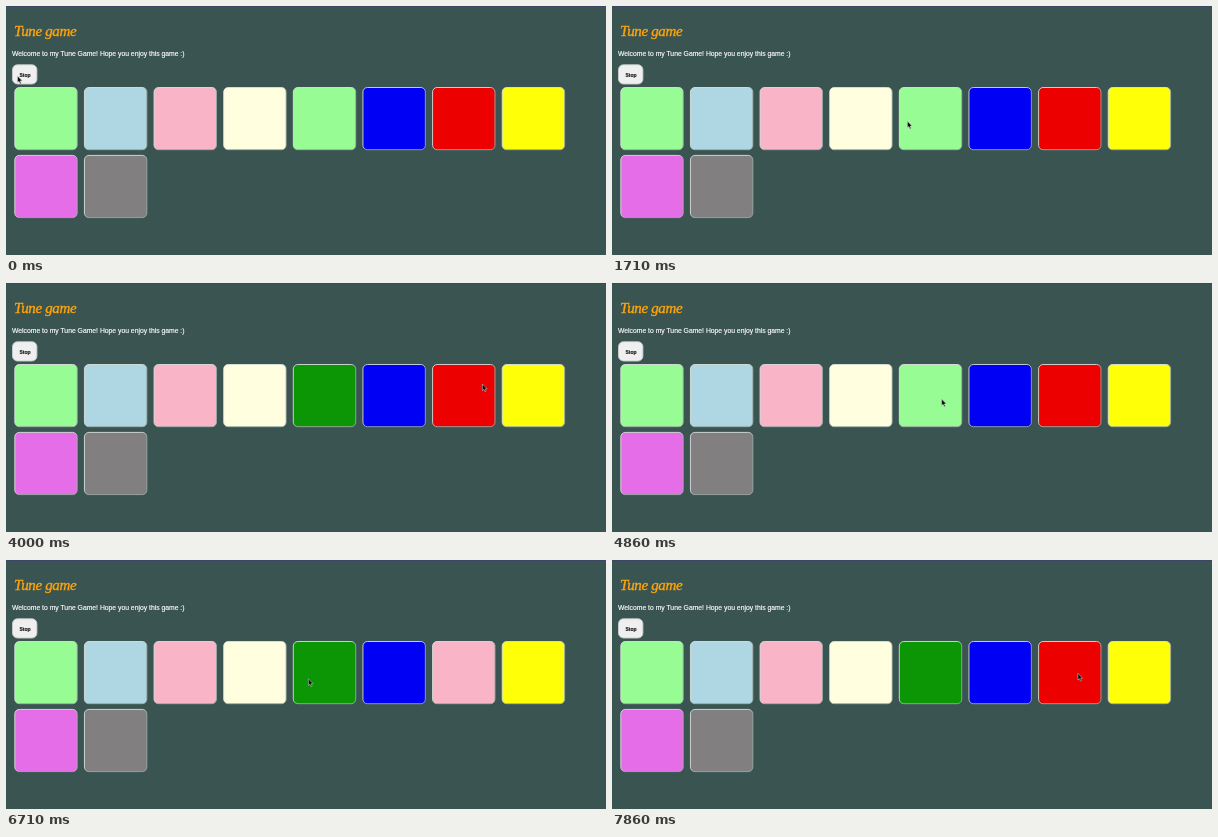
Recreate the animation shown at these times as an HTML page. Size 600 by 249 pixels, loop 8000 ms.

```html
<!DOCTYPE html>
<html lang="en">
<head>
<meta charset="utf-8">
<title>Tune game</title>
<style>
  html, body { margin: 0; width: 100%; height: 100%; overflow: hidden; background: #3a5452; }
  svg { display: block; width: 100vw; height: 100vh; }
  .title { font: italic 15px "Liberation Serif", serif; letter-spacing: -.35px; fill: #ffa50a; stroke: #ffa50a; stroke-width: .35; }
  .intro { font: 6.8px "Liberation Sans", Arial, sans-serif; fill: #fff; stroke: #fff; stroke-width: .16; }
  .label { font: bold 5px "Liberation Sans", Arial, sans-serif; fill: #111; stroke: #111; stroke-width: .12; }
</style>
</head>
<body>
<svg viewBox="0 0 600 249" preserveAspectRatio="none">
  <defs>
    <linearGradient id="edge" x1="0" y1="0" x2="1" y2="1">
      <stop offset=".46" stop-color="#dfe5e1"/>
      <stop offset=".54" stop-color="#9dada6"/>
    </linearGradient>
  </defs>
  <rect width="600" height="249" fill="#3a5452"/>
  <rect width="600" height="1" fill="#3d4566"/>
  <text class="title" x="8" y="30">Tune game</text>
  <text class="intro" x="6" y="50.2">Welcome to my Tune Game! Hope you enjoy this game :)</text>
  <rect x="6.5" y="58.8" width="24.4" height="19.2" rx="5" fill="#f0eff0" stroke="#c9cfcd" stroke-width=".9"/>
  <text class="label" x="19" y="70.5" text-anchor="middle">Stop</text>
  <g id="tiles" stroke="url(#edge)" stroke-width=".85"></g>
  <path id="cursor" d="M0 0V6.6L1.5 5.3L2.6 7.7L3.7 7.2L2.7 4.9L4.7 4.8Z" fill="#0a0a0a" stroke="#d5dcda" stroke-width=".5" stroke-linejoin="round"/>
</svg>
<script>
const LOOP = 8000, FPS = 7;
const COLS = 8, PITCH = 69.63, ROW = 67.9;
const colors = ['#98fc94', '#afd7e3', '#f9b4c8', '#ffffe0', '#0c9606',
                '#0000f4', '#ec0000', '#ffff08', '#e56de8', '#827f81'];
const GREEN = 4, RED = 6;
const litColors = { [GREEN]: '#98fc94', [RED]: '#f9b4c8' };

// Each round plays one more note of the melody; times are in steps of 1/FPS s
const melody = [GREEN, RED, RED];
const rounds = [0, 14, 32];
const HOLD = 5, PAUSE = 1, PRESS = 2;

const note = (tile, on, length) => ({ tile, on, off: on + length });
const clues = rounds.flatMap((start, r) =>
  melody.slice(0, r + 1).map((tile, i) => note(tile, start + i * (HOLD + PAUSE), HOLD)));
const presses = [[GREEN, 11], [GREEN, 25], [RED, 29], [GREEN, 49]]
  .map(([tile, on]) => note(tile, on, PRESS));
const notes = [...clues, ...presses];

const home = { x: 11.5, y: 70 };
const moves = [
  { from: 1, to: 8, x: 295.4, y: 115.2 },
  { from: 26, to: 28, x: 476.4, y: 101 },
  { from: 31, to: 35, x: 302.4, y: 118.8 },
  { from: 51, to: 55, x: 465.9, y: 113.4 }
];

const cursor = document.getElementById('cursor');
const tiles = colors.map((fill, i) => {
  const rect = document.createElementNS('http://www.w3.org/2000/svg', 'rect');
  const attrs = {
    x: 8.8 + (i % COLS) * PITCH, y: 81.5 + Math.floor(i / COLS) * ROW,
    width: 62.4, height: 62.2, rx: 4.5, fill
  };
  for (const key in attrs) rect.setAttribute(key, attrs[key]);
  return document.getElementById('tiles').appendChild(rect);
});

const clamp = u => Math.min(1, Math.max(0, u));
const ease = u => u * u * (3 - 2 * u);

function pointerAt(step) {
  return moves.reduce((p, { from, to, x, y }) => {
    const u = ease(clamp((step - from) / (to - from)));
    return { x: p.x + (x - p.x) * u, y: p.y + (y - p.y) * u };
  }, home);
}

function draw(ms) {
  // Small offset absorbs timestamps rounded to 10 ms
  const step = Math.floor((ms % LOOP + 6) * FPS / 1000) % (LOOP * FPS / 1000);
  tiles.forEach((rect, i) => {
    const lit = notes.some(n => n.tile === i && step >= n.on && step < n.off);
    rect.setAttribute('fill', lit ? litColors[i] : colors[i]);
  });
  const { x, y } = pointerAt(step);
  cursor.setAttribute('transform', `translate(${x} ${y})`);
}

let start;
function tick(now) {
  start ??= now;
  draw(now - start);
  requestAnimationFrame(tick);
}
draw(0);
requestAnimationFrame(tick);
</script>
</body>
</html>
```
